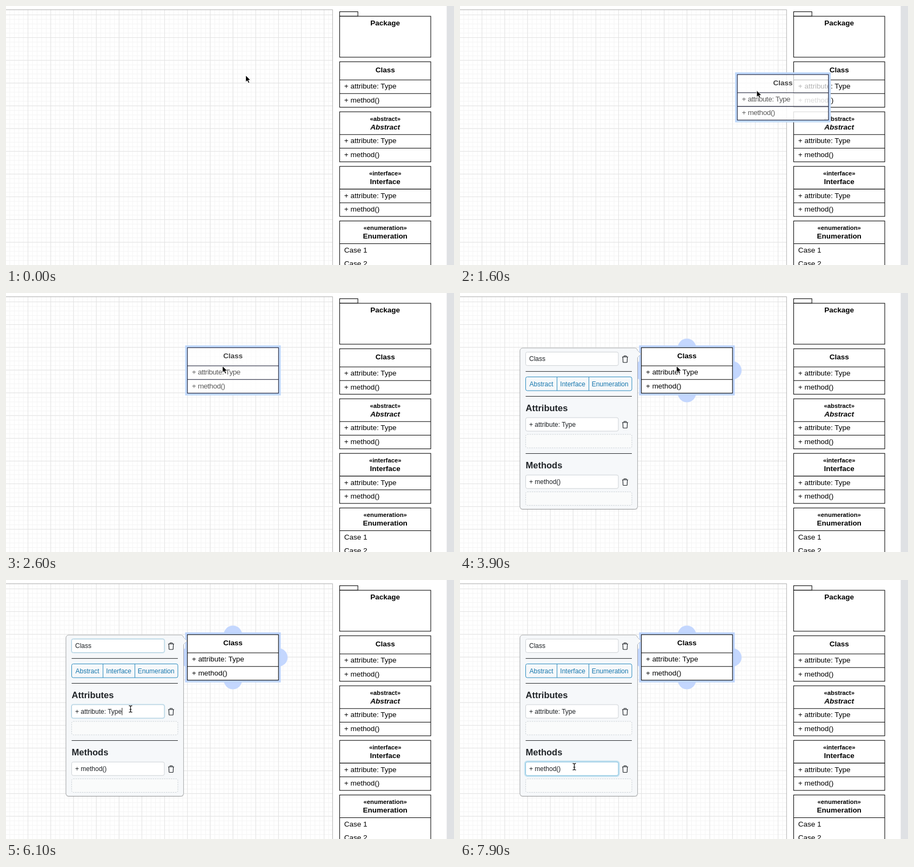
An HTML page for the animation above (8 s loop, 829 by 480 pixels).

```html
<!DOCTYPE html>
<html lang="en">
<head>
<meta charset="utf-8">
<title>Class diagram editor</title>
<style>
  html, body { margin: 0; width: 100%; height: 100%; overflow: hidden; background: #fff; }
  svg { display: block; width: 829px; height: 480px; font-family: "Liberation Sans", Arial, sans-serif; }
  text { white-space: pre; }
  .mid { text-anchor: middle; }
  .bold { font-weight: bold; }
</style>
</head>
<body>
<svg id="stage" viewBox="0 0 829 480"></svg>
<script>
const LOOP = 8000, STEP = 100;
const UNIT = 0.843;            // diagram units to pixels
const GRAB = [64.8, 33.9];     // pointer position inside the dragged box
const LAG = 40;                // the dragged box trails the pointer
const HOME = [335.6, 101.3];   // where the box is dropped
const DROP = 3000, OPEN = 3600;

// pointer path: time, x, y
const PATH = [
  [1000, 443.5, 128.5], [1200, 545, 138], [1400, 682, 137], [1440, 682, 137],
  [1560, 578, 161], [1600, 549, 156.5], [1750, 495, 155], [1860, 476, 152.6],
  [1900, 468.5, 153], [2100, 412, 143], [2250, 393, 138], [2400, 393, 135.5],
  [2550, 400.5, 135.2], [4350, 400.5, 135.2], [4550, 315, 136], [4700, 250, 133],
  [5000, 222, 122], [5350, 222, 122], [5700, 238, 190], [6000, 230.5, 239],
  [6350, 230.5, 239], [6700, 223, 300], [7100, 211.5, 346]
];

// form fields: text, top, caret x, focus and blur times
const FIELDS = [
  { text: 'Class', y: 109.5, caret: 158.7, on: 5030, off: 6025 },
  { text: '+ attribute: Type', y: 231, caret: 214.8, on: 6025, off: 7350 },
  { text: '+ method()', y: 337.3, caret: 186, on: 7350, off: Infinity }
];

const clamp = v => Math.max(0, Math.min(1, v));
const smooth = v => { v = clamp(v); return v * v * (3 - 2 * v); };
const mix = (a, b, k) => `rgb(${a.map((v, i) => Math.round(v + (b[i] - v) * k))})`;

const rect = (x, y, w, h, more = '') => `<rect x="${x}" y="${y}" width="${w}" height="${h}" ${more}/>`;
const line = (x1, y1, x2, y2, more = '') => `<path d="M${x1} ${y1}L${x2} ${y2}" ${more}/>`;
const text = (x, y, size, str, more = '') => `<text x="${x}" y="${y}" font-size="${size}" ${more}>${str}</text>`;
const place = (x, y, body) => `<g transform="translate(${x} ${y}) scale(${UNIT})">${body}</g>`;
const INK = 'fill="none" stroke="#000" stroke-width="1.25"';

function heading(title, stereo, style = '') {
  const name = text(100, stereo ? 39.2 : 23.9, 16, title, `class="mid bold" ${style}`);
  return name + (stereo ? text(100, 20.2, 13.4, `«${stereo}»`, 'class="mid bold"') : '');
}

function classBox(title, stereo, style) {
  const top = stereo ? 50 : 40;
  return rect(0, 0, 200, top + 60, 'fill="#fff" stroke="#000" stroke-width="1.25"')
    + line(0, top, 200, top, INK) + line(0, top + 30, 200, top + 30, INK)
    + heading(title, stereo, style)
    + text(10, top + 19.3, 16, '+ attribute: Type')
    + text(10, top + 49.3, 16, '+ method()');
}

function ghostBox() {
  const thin = 'fill="#5c5c5c" letter-spacing="-.5"';
  const edge = 'fill="none" stroke="#10142c" stroke-width="1.25"';
  return rect(-2.5, -2.5, 205, 105, 'fill="none" stroke="#bfd8fb" stroke-width="5"')
    + rect(0, 0, 200, 100, 'fill="#fff" fill-opacity=".7"')
    + rect(0, 40, 200, 60, 'fill="#fff" fill-opacity=".5"')
    + rect(0, 0, 200, 100, edge) + line(0, 40, 200, 40, edge) + line(0, 70, 200, 70, edge)
    + heading('Class', '', 'fill="#444"')
    + text(10, 59.3, 16, '+ attribute: Type', thin)
    + text(10, 89.3, 16, '+ method()', thin);
}

function selectedBox() {
  const dots = [[100, 0], [200, 50], [100, 100], [0, 50]]
    .map(([x, y]) => `<circle cx="${x}" cy="${y}" r="20" fill="#c4d7fe"/>`).join('');
  return dots + rect(-2.5, -2.5, 205, 105, 'fill="none" stroke="#bdd4fc" stroke-width="5"') + classBox('Class');
}

function gridLines(gap, color) {
  let d = '';
  for (let x = 335.7 % gap; x < 604; x += gap) d += `M${x.toFixed(2)} 7V480`;
  for (let y = 100.7 % gap; y < 480; y += gap) if (y > 7) d += `M0 ${y.toFixed(2)}H604`;
  return `<path d="${d}" stroke="${color}" fill="none"/>`;
}

function palette() {
  const pack = rect(0, 0, 40, 10, INK) + rect(0, 10, 200, 90, 'fill="#fff" stroke="#000" stroke-width="1.25"')
    + text(100, 29.8, 16, 'Package', 'class="mid bold"');
  const cases = rect(0, 0, 200, 140, 'fill="#fff" stroke="#000" stroke-width="1.25"')
    + line(0, 50, 200, 50, INK) + heading('Enumeration', 'enumeration')
    + text(10, 69.3, 16, 'Case 1') + text(10, 99.3, 16, 'Case 2');
  return [
    [0, pack], [110, classBox('Class')],
    [220, classBox('Abstract', 'abstract', 'font-style="italic"')],
    [340, classBox('Interface', 'interface')], [460, cases]
  ].map(([y, body]) => place(617.4, 10.6 + y * UNIT, body)).join('');
}

function trash(y) {
  return `<path transform="translate(305.5 ${y})" fill="none" stroke="#212529" stroke-width="1.15"
    d="M-5.5 -4H5.5M-2 -4.5V-6H2V-4.5M-4.2 -4L-3.8 5.4Q-3.7 6.2 -3 6.2H3Q3.7 6.2 3.8 5.4L4.2 -4"/>`;
}

function popover() {
  const blue = 'fill="none" stroke="#2b8cc0"';
  const label = (x, s) => text(x, 172.7, 12, s, 'class="mid" fill="#1576ad"');
  const rule = y => line(121.5, y, 318, y, 'stroke="#26292c"');
  const slot = y => rect(121.5, y, 196.5, 25, 'rx="3" fill="#fafbfb" stroke="#ccd2d7" stroke-dasharray="2.5 1.7"');
  return rect(111, 102.8, 217.5, 298.5, 'rx="5" fill="none" stroke="#000" stroke-opacity=".15" stroke-width="1.6"')
    + rect(111, 102, 217.5, 298.5, 'rx="5" fill="#f6f8fa" stroke="#adafb1"')
    + '<path d="M328 106L335 113L328 120" fill="#f6f8fa" stroke="#c0c4c8"/>'
    + rule(145.4) + rule(191.5) + rule(297.5)
    + rect(121.5, 155.5, 196.5, 25.5, 'rx="3" ' + blue)
    + line(179.5, 155.5, 179.5, 181, blue) + line(238.5, 155.5, 238.5, 181, blue)
    + label(150.5, 'Abstract') + label(208.7, 'Interface') + label(277.7, 'Enumeration')
    + text(121.5, 219, 16.5, 'Attributes', 'class="bold" fill="#212529"')
    + text(121.5, 325.3, 16.5, 'Methods', 'class="bold" fill="#212529"')
    + slot(262) + slot(368.5)
    + FIELDS.map((f, i) => rect(121.5, f.y, 171.5, 25, `id="ring${i}" rx="3" fill="none" stroke="#c6e3f1"`)
      + rect(121.5, f.y, 171.5, 25, `id="field${i}" rx="3" fill="#fff"`)
      + text(128, f.y + 16.8, 12, f.text, 'fill="#1d2125"')
      + line(f.caret, f.y + 6, f.caret, f.y + 19.5, `id="caret${i}" stroke="#222"`)
      + trash(f.y + 13)).join('');
}

const byId = id => document.getElementById(id);
byId('stage').innerHTML =
  gridLines(50 * UNIT / 5, '#f4f4f4') + gridLines(50 * UNIT, '#e3e3e3')
  + '<path d="M0 6.8H604.3V480" fill="none" stroke="#b0b0b0"/>'
  + rect(815.5, 0, 14, 480, 'fill="#dfe1e4"')
  + palette()
  + `<g id="box">${place(HOME[0], HOME[1], selectedBox())}</g>`
  + `<g id="ghost">${place(0, 0, ghostBox())}</g>`
  + `<g id="popover">${popover()}</g>`
  + '<path id="arrow" d="M0 0V12.4L2.9 9.8L5 14.4L7.2 13.4L5.2 9H9Z" fill="#000" stroke="#fff" stroke-width=".9"/>'
  + `<g id="beam" fill="none"><path d="M-3 -6Q0 -6 0 -4.5Q0 -6 3 -6M0 -4.5V4.5M-3 6Q0 6 0 4.5Q0 6 3 6"
      stroke="#111" stroke-width="1.3"/><path d="M-2 1H2" stroke="#111"/></g>`;

function pointer(t) {
  const i = PATH.findIndex(p => p[0] > t);
  if (i === 0) return PATH[0].slice(1);
  if (i < 0) return PATH[PATH.length - 1].slice(1);
  const [t0, x0, y0] = PATH[i - 1], [t1, x1, y1] = PATH[i];
  const k = (t - t0) / (t1 - t0);
  return [x0 + (x1 - x0) * k, y0 + (y1 - y0) * k];
}

const show = (id, on) => byId(id).setAttribute('visibility', on ? 'inherit' : 'hidden');
const move = (id, [x, y]) => byId(id).setAttribute('transform', `translate(${x.toFixed(2)} ${y.toFixed(2)})`);

function drawField(f, i, t) {
  const focus = smooth((t - f.on) / 150) * (1 - smooth((t - f.off) / 150));
  const field = byId('field' + i), ring = byId('ring' + i);
  field.setAttribute('stroke', mix([206, 210, 214], [126, 190, 221], focus));
  ring.setAttribute('stroke-width', 1 + 4.4 * focus);
  ring.setAttribute('stroke-opacity', focus);
  const typing = t >= f.on && t < f.off;
  show('caret' + i, typing && (t - f.on) % 1000 < 450);
}

function draw(now) {
  const t = Math.floor((now % LOOP) / STEP) * STEP;
  const at = pointer(t);
  const trail = pointer(t - LAG);
  show('ghost', t >= 1500 && t < DROP);
  move('ghost', [trail[0] - GRAB[0], trail[1] - GRAB[1]]);
  show('box', t >= DROP);
  show('popover', t >= OPEN);
  byId('popover').setAttribute('opacity', smooth((t - OPEN + 75) / 150));
  FIELDS.forEach((f, i) => drawField(f, i, t));

  const overText = t >= OPEN && at[0] > 121 && at[0] < 293
    && FIELDS.some(f => at[1] > f.y && at[1] < f.y + 25);
  show('arrow', !overText);
  show('beam', overText);
  move('arrow', at);
  move('beam', at);
}

const start = performance.now();
function tick() {
  draw(performance.now() - start);
  requestAnimationFrame(tick);
}
draw(0);
requestAnimationFrame(tick);
</script>
</body>
</html>
```
